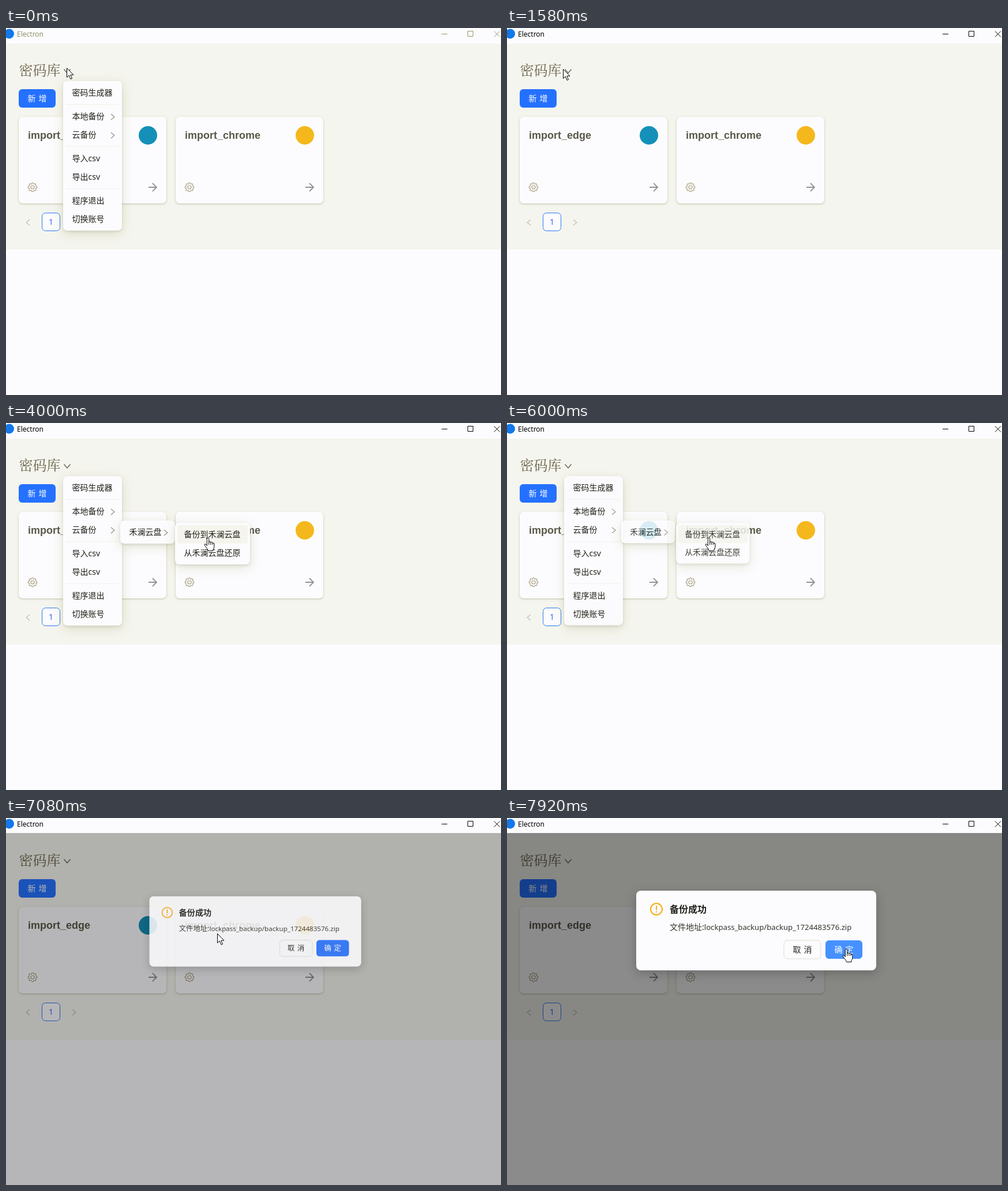
An HTML page that plays this animation: 858x636 px, repeating every 8 s.

```html
<!DOCTYPE html>
<html lang="zh">
<head>
<meta charset="utf-8">
<title>密码库</title>
<style>
  html, body { margin: 0; width: 100%; height: 100%; overflow: hidden; background: #fcfcfe; }
  svg { display: block; font-family: 'Noto Sans', 'Noto Sans CJK SC', sans-serif; }
  text { white-space: pre; }
  .panel { filter: drop-shadow(0 2px 2px rgba(90, 90, 60, .15)) drop-shadow(0 5px 10px rgba(130, 130, 60, .22)); }
  .card { filter: drop-shadow(0 1px 1px rgba(100, 100, 80, .25)) drop-shadow(0 1px 2px rgba(150, 150, 80, .2)); }
  #modal { filter: drop-shadow(0 5px 9px rgba(0, 0, 0, .22)); }
</style>
</head>
<body>
<svg id="stage" width="858" height="636" viewBox="0 0 858 636"></svg>
<script>
const LOOP = 8000, FRAME = 1000 / 12, FADE = 200;
const WHITE = '#fcfcfe', INK = '#20201a', BLUE = '#2571ff', HOVER = '#4691ff', BORDER = '#dcdcd0';
const $ = id => document.getElementById(id);

// ---- drawing helpers ----
const label = (x, cy, s, size = 14, fill = INK, more = '') =>
  `<text x="${x}" y="${cy + size * .37}" font-size="${size}" fill="${fill}" ${more}>${s}</text>`;
const box = (x, y, w, h, r, fill, more = '') =>
  `<rect x="${x}" y="${y}" width="${w}" height="${h}" rx="${r}" fill="${fill}" ${more}/>`;
const line = (d, stroke, width = 1) =>
  `<path d="${d}" fill="none" stroke="${stroke}" stroke-width="${width}"/>`;
const dot = (x, y, r, fill) => `<circle cx="${x}" cy="${y}" r="${r}" fill="${fill}"/>`;
const ring = (x, y, r, stroke, width) =>
  `<circle cx="${x}" cy="${y}" r="${r}" fill="none" stroke="${stroke}" stroke-width="${width}"/>`;
const chevron = (x, y, dir, stroke) => line(`M${x - 3 * dir} ${y - 5}l${6 * dir} 5l${-6 * dir} 5`, stroke, 1.1);
const button = (x, y, s, fill, ink, more = '') =>
  box(x, y, 64, 32, 6, fill, more) +
  label(x + 32, y + 16, s, 14, ink, 'text-anchor="middle" style="word-spacing:1.5px"');

function gear(x, y) {
  const points = Array.from({ length: 64 }, (_, i) => {
    const a = i * Math.PI / 32, r = 7 + .9 * Math.cos(8 * a);
    return `${(x + r * Math.cos(a)).toFixed(1)} ${(y + r * Math.sin(a)).toFixed(1)}`;
  });
  return line(`M${points.join('L')}Z`, '#aba083', 1.2) + ring(x, y, 3, '#aba083', 1.2);
}

const card = (x, name, color) =>
  box(x, 154, 256, 150, 7, WHITE, 'class="card"') +
  label(x + 16, 185.5, name, 18, '#5a5848', `font-weight="bold" font-family="'Liberation Sans', sans-serif"`) +
  dot(x + 224, 186, 16, color) + gear(x + 24, 276) +
  line(`M${x + 225} 276h14m-7-7l7 7l-7 7`, '#8f9492', 1.8);

// ---- popup menus; spans are the [open, close] times ----
const CLICK = 5980;
const panels = [
  { id: 'main', x: 99, y: 92, w: 102, spans: [[-FADE, 1000], [1800, CLICK]],
    rows: ['密码生成器', '-', '本地备份>', '云备份>', '-', '导入csv', '导出csv', '-', '程序退出', '切换账号'] },
  { id: 'cloud', x: 198, y: 169, w: 95, spans: [[490, 720], [2600, CLICK]], rows: ['禾澜云盘>'] },
  { id: 'local', x: 198, y: 137, w: 86, spans: [[2330, 2700]], rows: ['系统备份', '系统还原'] },
  { id: 'target', x: 293, y: 173, w: 130, spans: [[3300, CLICK]], rows: ['备份到禾澜云盘', '从禾澜云盘还原'] }
];
const items = [];

function panelMarkup(p) {
  let y = 4, body = '';
  for (const row of p.rows) {
    if (row === '-') {
      body += line(`M5 ${y + 4.5}H${p.w - 5}`, '#f1f1e8');
      y += 9;
      continue;
    }
    const id = p.id + y;
    items.push({ id, panel: p, x: p.x + 4, y: p.y + y, w: p.w - 8 });
    body += box(4, y, p.w - 8, 32, 4, '#f5f5ee', `id="${id}"`) +
      label(15.5, y + 16, row.replace('>', '')) +
      (row.endsWith('>') ? chevron(p.w - 16, y + 17, 1, '#8c8c80') : '');
    y += 32;
  }
  return `<g id="${p.id}" class="panel">${box(0, 0, p.w, y + 4, 7, WHITE)}${body}</g>`;
}

// ---- scene ----
$('stage').innerHTML =
  box(0, 0, 858, 636, 0, WHITE) + box(0, 27, 858, 357, 0, '#f5f5ef') +
  dot(5.5, 10, 8.5, '#1378ea') +
  `<g id="bar">${label(19, 10.5, 'Electron', 12, 'currentColor')}` +
  line('M755 10.5h10M800.5 5.5h9v9h-9zM846 5.5l10 10m0-10l-10 10', 'currentColor') + '</g>' +
  label(22.5, 73, '密码库', 24, '#686248', `font-weight="500" font-family="'Noto Serif', 'Noto Serif CJK SC', 'Noto Sans CJK SC', serif"`) +
  line('M100.5 71.5l5.500 6.500l5.500-6.500', '#65614c', 1.3) +
  button(22, 106, '新 增', BLUE, '#fff') +
  card(22, 'import_edge', '#1590b8') + card(294, 'import_chrome', '#f5b81c') +
  chevron(38, 337, -1, '#bdbda6') + chevron(118, 337, 1, '#bdbda6') +
  box(62.5, 320.5, 31, 31, 6, WHITE, 'stroke="#2a78ee"') +
  label(78, 336, '1', 14, '#3c64f8', 'text-anchor="middle"') +
  panels.map(panelMarkup).join('') +
  box(0, 26, 858, 610, 0, '#000', 'id="mask"') +
  '<g id="modal">' + box(224, 126, 416, 138, 8, WHITE) +
  ring(259, 158, 10, '#faad14', 2) + line('M259 152v7.5m0 2v2', '#faad14', 2) +
  label(282, 158, '备份成功', 16, INK, 'font-weight="bold"') +
  label(282, 189, '文件地址:<tspan font-size="13.15">lockpass_backup/backup_1724483576.zip</tspan>', 14, '#33332e') +
  `<g id="cancel">${button(480, 212, '取 消', WHITE, 'currentColor')}</g>` +
  `<g id="ok">${button(552, 212, '确 定', 'currentColor', '#fff')}</g></g>` +
  '<g id="pointer" stroke="#000" stroke-linejoin="round" fill="#fff">' +
  '<path id="arrow" d="M.5 .5V16.5L4.2 13L7 19.5L9.5 18.5L6.8 12.2H12Z"/>' +
  '<g id="hand"><path d="M-1.7 13.5V1.7a1.7 1.7 0 0 1 3.4 0V8q0-1.5 1.6-1.5t1.6 2q0-1.5 1.6-1.3t1.6 2q2.8-1 2.8 1.5V15q0 3-2 5v2.5H.5Q0 20-3 16.5l-3-4.2q0-2 2-1.5z"/>' +
  line('M1.7 8v4M4.9 8.5v3.5M8.1 9v3', '#000') + '</g></g>';

// ---- motion ----
const ramp = (t, from, length) => Math.min(1, Math.max(0, (t - from) / length));
const easeOut = u => 1 - (1 - u) ** 2;
const smooth = u => u * u * (3 - 2 * u);
const visible = (spans, t) =>
  Math.max(...spans.map(([open, close]) => Math.min(ramp(t, open, FADE), 1 - ramp(t, close, FADE))));

// Pointer moves: depart, arrive, destination.
const moves = [
  [170, 590, 160, 185], [670, 916, 92, 345], [1083, 1500, 97, 71], [1833, 2750, 160, 187],
  [2850, 3416, 282, 192], [3666, 4000, 350, 199], [6833, 7080, 366, 200], [7250, 7910, 588, 227]
];
function pointerAt(t) {
  let x = 105, y = 69;
  for (const [depart, arrive, toX, toY] of moves) {
    const u = smooth(ramp(t, depart, arrive - depart));
    x += (toX - x) * u;
    y += (toY - y) * u;
  }
  return [x, y];
}

function render(now) {
  const t = Math.floor((now % LOOP + 5) / FRAME) * FRAME % LOOP;
  const [px, py] = pointerAt(t);
  const over = (x, y, w) => px >= x && px < x + w && py >= y && py < y + 32;
  let hand = false;

  $('bar').style.color = t < 1080 ? '#93936c' : '#000';

  // The main menu unrolls downwards, submenus zoom from their corner.
  for (const p of panels) {
    const main = p.id === 'main', u = visible(p.spans, t);
    p.shown = main ? easeOut(u) : u;
    const s = .8 + .2 * p.shown;
    $(p.id).setAttribute('transform', `translate(${p.x} ${p.y}) scale(${main ? 1 : s} ${s})`);
    $(p.id).style.opacity = p.shown ** 1.5;
  }
  for (const item of items) {
    const on = item.panel.shown > .7 && over(item.x, item.y, item.w);
    $(item.id).style.opacity = +on;
    hand ||= on;
  }

  const dim = ramp(t, 6960, FADE), zoom = easeOut(dim);
  $('mask').style.opacity = .45 * dim;
  $('modal').setAttribute('transform', `translate(433 208) scale(${.2 + .8 * zoom}) translate(-433 -208)`);
  $('modal').style.opacity = zoom;

  const onCancel = dim === 1 && over(480, 212, 64), onOk = dim === 1 && over(552, 212, 64);
  $('cancel').style.color = onCancel ? HOVER : INK;
  $('cancel').firstChild.style.stroke = onCancel ? HOVER : BORDER;
  $('ok').style.color = onOk ? HOVER : BLUE;
  hand ||= onCancel || onOk;

  $('pointer').setAttribute('transform', `translate(${px} ${py})`);
  $('arrow').style.display = hand ? 'none' : '';
  $('hand').style.display = hand ? '' : 'none';
}

const start = performance.now();
function tick() {
  render(performance.now() - start);
  requestAnimationFrame(tick);
}
tick();
</script>
</body>
</html>
```
